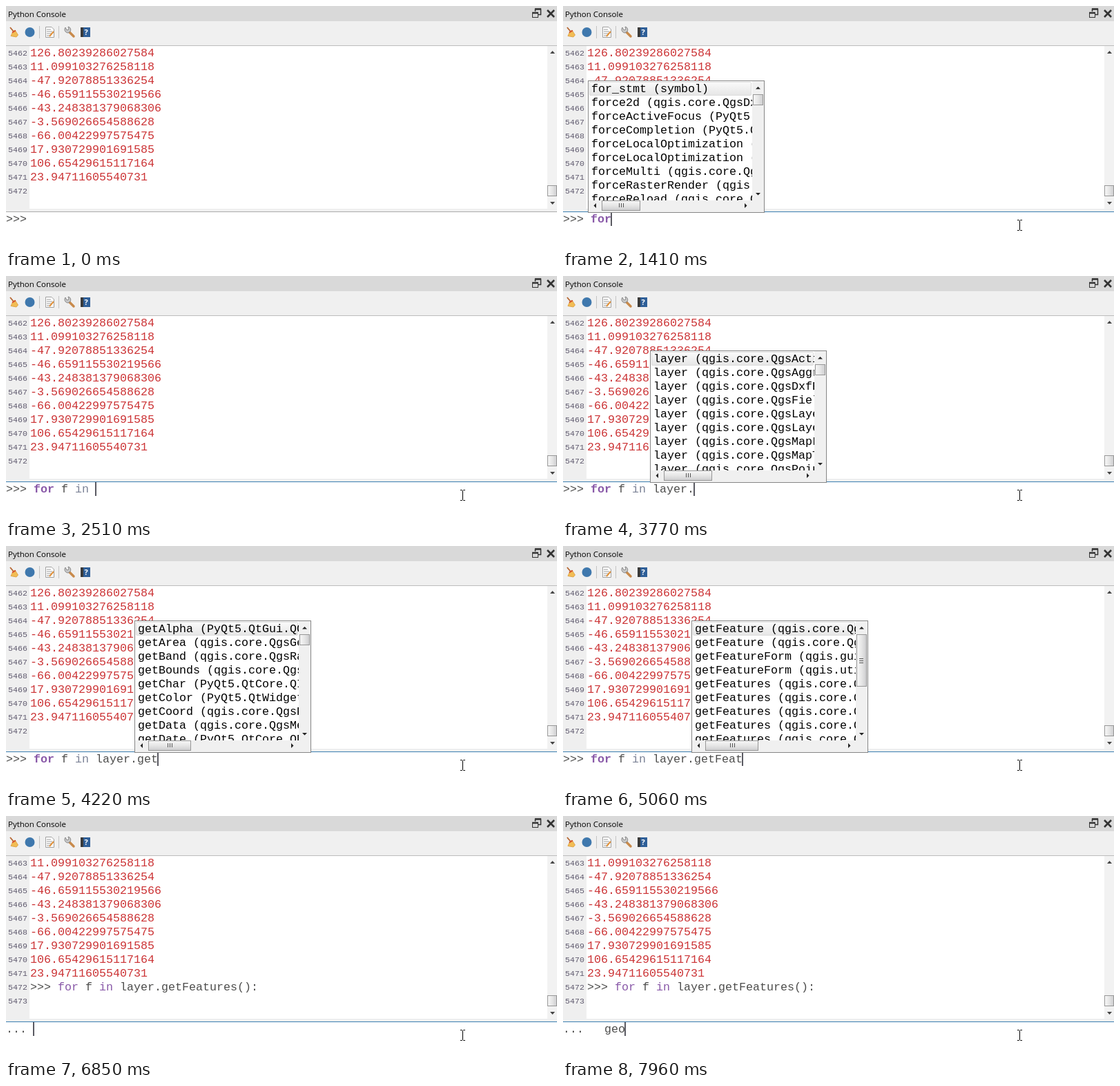
Animation of 798x351 px, one loop 8 s. Source, as an HTML page:

```html
<!DOCTYPE html>
<html lang="en">
<head>
<meta charset="utf-8">
<title>Python Console</title>
<style>
html, body { margin: 0; width: 100%; height: 100%; overflow: hidden; background: #fff; }
svg { display: block; }
text { font: 16.667px "Liberation Mono", monospace; white-space: pre; fill: #4d4d4c; }
rect { shape-rendering: crispEdges; }
.title { font: 11.5px "Open Sans", sans-serif; fill: #000; }
.num { font-size: 11.667px; fill: #5f5a6e; }
.val { fill: #cc3436; }
.item { fill: #000; }
.tip { fill: #808080; }
.key { fill: #8959a8; }
.bold { font-weight: bold; }
.in { fill: #7b8296; }
.hot { fill: #f00; }
</style>
</head>
<body>
<svg width="798" height="351" viewBox="0 0 798 351">
  <defs>
    <linearGradient id="thumbV"><stop stop-color="#f7f7f7"/><stop offset=".5" stop-color="#e6e6e6"/><stop offset="1" stop-color="#cdcdcf"/></linearGradient>
    <linearGradient id="thumbH" x2="0" y2="1"><stop stop-color="#f7f7f7"/><stop offset=".5" stop-color="#e6e6e6"/><stop offset="1" stop-color="#cdcdcf"/></linearGradient>
    <linearGradient id="pick" x2="0" y2="1"><stop stop-color="#fafafa"/><stop offset="1" stop-color="#e6e6e6"/></linearGradient>
    <clipPath id="view"><rect x="0" y="1" width="238" height="173"/></clipPath>
  </defs>
  <rect width="798" height="351" fill="#fff"/>
  <rect width="798" height="22" fill="#d9d9d9"/>
  <rect y="22" width="798" height="36" fill="#f0f0f0"/>
  <rect y="57" width="798" height="1" fill="#bcbcbc"/>
  <text class="title" x="3" y="16">Python Console</text>
  <g fill="none" stroke="#333">
    <path d="M766.5 8V4.500H774.500V12.500H771" stroke-width="1.500"/>
    <path d="M766 4.500H775" stroke-width="2.500"/>
    <rect x="762.500" y="9.500" width="8" height="7" fill="#d9d9d9" stroke-width="1.500"/>
    <path d="M762 10H771" stroke-width="2.500"/>
    <path d="M784 6L794 16M794 6L784 16" stroke-width="2.600"/>
  </g>
  <!-- toolbar -->
  <path d="M6 31L11 37" stroke="#b5652f" stroke-width="1.800"/>
  <path d="M10 37L13 35L17.500 42L15 45L7 43.500Z" fill="#f2bd55" stroke="#d99a3a" stroke-width=".8"/>
  <path d="M9 38.500L14 35.500" stroke="#d24b2c" stroke-width="1.600"/>
  <circle cx="34.500" cy="38" r="7" fill="#3f78ad"/>
  <rect x="48" y="29" width="1" height="18" fill="#c4c4c4"/>
  <path d="M57.500 30.500H66L69.500 34V45.500H57.500Z" fill="#fff" stroke="#a0a0a0"/>
  <path d="M59 34H65M59 37H67M59 40H66M59 43H64" stroke="#999"/>
  <path d="M63 44L69 37" stroke="#e0913a" stroke-width="2"/>
  <rect x="76" y="29" width="1" height="18" fill="#c4c4c4"/>
  <path d="M92 38L98 44" stroke="#c88a4c" stroke-width="3.500" stroke-linecap="round"/>
  <path d="M86 31L88 35L91 34L90 30A4.500 4.500 0 0 1 93 37L90 39A5 5 0 0 1 85 33Z" fill="#c9c9c9" stroke="#777" stroke-width=".8"/>
  <rect x="108" y="31" width="14" height="14" fill="#2f5f98"/>
  <rect x="108" y="31" width="4" height="14" fill="#3a3a3a"/>
  <text x="113.500" y="42" style="font:bold 11px 'Open Sans',sans-serif;fill:#fff">?</text>
  <!-- output pane -->
  <rect y="58" width="34" height="236" fill="#efefef"/>
  <g id="out"></g>
  <rect x="784" y="58" width="14" height="236" fill="#f2f2f2"/>
  <path d="M788 69L791.500 65L795 69ZM788 284L791.500 288L795 284Z" fill="#444"/>
  <rect x="784.500" y="260.500" width="13" height="15" fill="url(#thumbV)" stroke="#979797"/>
  <rect y="294" width="798" height="4" fill="#f0f0f0"/>
  <rect id="edge" y="298" width="798" height="1"/>
  <g id="line"></g>
  <g id="over"></g>
  <g id="mouse">
    <path d="M-3.500 -7.500H-1L0 -6.500L1 -7.500H3.500M0 -6.500V6.500M-3.500 7.500H-1L0 6.500L1 7.500H3.500" fill="none" stroke="#fff" stroke-width="3"/>
    <path d="M-3.500 -7.500H-1L0 -6.500L1 -7.500H3.500M0 -6.500V6.500M-3.500 7.500H-1L0 6.500L1 7.500H3.500" fill="none" stroke="#000"/>
  </g>
</svg>
<script>
const LOOP = 8000;
const $ = id => document.getElementById(id);
const esc = s => s.replace(/&/g, '&amp;').replace(/</g, '&lt;').replace(/>/g, '&gt;');
const rect = (x, y, w, h, fill, more = '') =>
  `<rect x="${x}" y="${y}" width="${w}" height="${h}" fill="${fill}" ${more}/>`;
const text = (cls, x, y, s) => `<text class="${cls}" x="${x}" y="${y}">${s}</text>`;

const values = ['126.80239286027584', '11.099103276258118', '-47.92078851336254',
  '-46.659115530219566', '-43.248381379068306', '-3.569026654588628',
  '-66.00422997575475', '17.930729901691585', '106.65429615117164', '23.94711605540731'];

const each = (head, ends) => ends.split('|').map(s => head + s);
const many = (n, s) => Array(n).fill(s);
const plural = 'getFeatures (qgis.core.Qgs';
const feature = [...many(2, 'getFeature (qgis.core.Qgs'), 'getFeatureForm (qgis.gui.Q',
  'getFeatureForm (qgis.utils', ...many(5, plural)];

// completion lists: left edge, rows, thumb height, thumb width
const lists = {
  for: [36, ['for_stmt (symbol)', 'force2d (qgis.core.QgsDxf', 'forceActiveFocus (PyQt5.Q',
    'forceCompletion (PyQt5.Qt', ...many(2, 'forceLocalOptimization (q'),
    'forceMulti (qgis.core.Qgs', 'forceRasterRender (qgis.c', 'forceReload (qgis.core.Qg'], 16, 56],
  in: [96, [...many(3, 'inRange (qgis.core.QgsRan'), 'inTransaction (qgis.core.',
    ...each('index (PyQt5.QtCore.', 'QAbs|QIte|QMod|QStr|QSor')], 16, 56],
  layer: [126, each('layer (qgis.core.',
    'QgsActio|QgsAggre|QgsDxfEx|QgsField|QgsLayer|QgsLayer|QgsMapLa|QgsMapTh|QgsPoint'), 16, 70],
  get: [186, each('get', 'Alpha (PyQt5.QtGui.QCo|Area (qgis.core.QgsGeo|Band (qgis.core.QgsRas|' +
    'Bounds (qgis.core.QgsR|Char (PyQt5.QtCore.QIO|Color (PyQt5.QtWidgets|' +
    'Coord (qgis.core.QgsPo|Data (qgis.core.QgsMes|Date (PyQt5.QtCore.QDa'), 16, 62],
  feature: [186, feature, 76, 77],
  features: [186, many(9, plural), 102, 77],
};

// time, typed text, open list
const steps = [
  [0, null],
  [560, ''],
  [940, 'f'], [1100, 'fo'], [1250, 'fo', 'for'], [1410, 'for', 'for'], [1560, 'for '],
  [1960, 'for f'], [2110, 'for f '], [2270, 'for f i'], [2350, 'for f in', 'in'], [2510, 'for f in '],
  [2970, 'for f in l'], [3130, 'for f in la', 'layer'], [3280, 'for f in lay', 'layer'],
  [3440, 'for f in laye', 'layer'], [3600, 'for f in layer', 'layer'],
  [3770, 'for f in layer.', 'layer'], [3820, 'for f in layer.'], [3990, 'for f in layer.g'],
  [4220, 'for f in layer.get', 'get'],
  [4530, 'for f in layer.getF', 'feature'], [4690, 'for f in layer.getFe', 'feature'],
  [4870, 'for f in layer.getFea', 'feature'], [5060, 'for f in layer.getFeat', 'feature'],
  [5230, 'for f in layer.getFeatu', 'feature'], [5300, 'for f in layer.getFeatur', 'feature'],
  [5380, 'for f in layer.getFeature', 'feature'], [5610, 'for f in layer.getFeatures', 'features'],
  [5920, 'for f in layer.getFeatures(', 'tip'], [6240, 'for f in layer.getFeatures()'],
  [6540, 'for f in layer.getFeatures():'],
  [6850, ''], [7160, ' '], [7320, '  '], [7700, '  g'], [7860, '  ge'], [7960, '  geo'],
];
const ENTER = 6850;

// pointer stops: time, x, y
const stops = [[70, 712, 346], [160, 697, 338], [260, 680, 328], [350, 668, 321], [440, 661, 318]];

const last = (table, t) => table.filter(s => s[0] <= t).pop();

function colour(code, typing) {
  const hot = typing && !code.endsWith(':');
  return code.split(/(\bfor\b|\bin\b|[()])/).map(s => {
    const cls = s === 'for' ? (typing ? 'key bold' : 'key')
      : s === 'in' ? (typing ? 'in' : 'key')
      : hot && /^[()]$/.test(s) ? 'hot' : '';
    return cls ? `<tspan class="${cls}">${s}</tspan>` : esc(s);
  }).join('');
}

function output(done) {
  const rows = done
    ? [...values.slice(1), '>>> for f in layer.getFeatures():', '']
    : [...values, ''];
  const first = done ? 5463 : 5462;
  return rows.map((s, i) => text('num', 3, 72 + 20 * i, first + i) +
    (s[0] === '>' ? text('', 35, 253, colour(s, false)) : text('val', 35, 73 + 20 * i, s))).join('');
}

function popup([x, rows, tall, wide]) {
  const items = rows.map((s, i) => text('item', 5, 17 + 20 * i, esc(s))).join('');
  const mid = 20 + wide / 2;
  const grip = [-3, 0, 3].map(d => rect(Math.round(mid + d), 178, 1, 6, '#555')).join('');
  const side = tall > 30
    ? [-3, 0, 3].map(d => rect(243, Math.round(20 + tall / 2 + d), 6, 1, '#555')).join('') : '';
  return `<g transform="translate(${x} 108)">` +
    rect(.5, .5, 255, 191, '#fff', 'stroke="#868686"') +
    rect(2.5, 2.5, 234, 19, 'url(#pick)', 'rx="2" stroke="#dcdcdc"') +
    `<g clip-path="url(#view)">${items}</g>` +
    rect(238, 1, 17, 190, '#f0f0f0') + rect(1, 174, 237, 17, '#f0f0f0') +
    rect(239.5, 20.5, 14, tall - 1, 'url(#thumbV)', 'rx="1" stroke="#979797"') + side +
    rect(20.5, 174.5, wide - 1, 14, 'url(#thumbH)', 'rx="1" stroke="#979797"') + grip +
    '<path d="M243 12.500L246.500 9L250 12.500ZM243 163L246.500 166.500L250 163ZM12 178L8.500 181.500L12 185ZM227 178L230.500 181.500L227 185Z" fill="#222"/></g>';
}

const tip = () => rect(172.5, 321.5, 640, 21, '#fff', 'stroke="#555"') +
  rect(177, 324, 12, 17, '#808080') +
  '<path d="M179 330H187L183 335Z" fill="#fff"/>' +
  text('tip', 191, 338, esc('getFeatures(QgsFeatureRequest request=QgsFeatureRequest()) -> QgsFeatureIterator'));

let shown, scrolled;
function draw(t) {
  const step = last(steps, t), done = t >= ENTER;
  if (done !== scrolled) $('out').innerHTML = output(scrolled = done);
  if (step !== shown) {
    shown = step;
    const [, typed, list] = step;
    const focus = typed !== null;
    $('edge').setAttribute('fill', focus ? '#3c7fb1' : '#ababab');
    $('line').innerHTML = text('', 0, 314, esc(done ? '... ' : '>>> ') + colour(typed || '', true)) +
      (focus ? rect(39 + 10 * typed.length, 299, 2, 20, '#5a5a62') : '');
    $('over').innerHTML = list === 'tip' ? tip() : list ? popup(lists[list]) : '';
  }
  const at = last(stops, t);
  $('mouse').setAttribute('visibility', at ? 'visible' : 'hidden');
  if (at) $('mouse').setAttribute('transform', `translate(${at[1] + .5} ${at[2]})`);
}

const start = performance.now();
function tick() {
  draw((performance.now() - start) % LOOP);
  requestAnimationFrame(tick);
}
draw(0);
requestAnimationFrame(tick);
</script>
</body>
</html>
```
